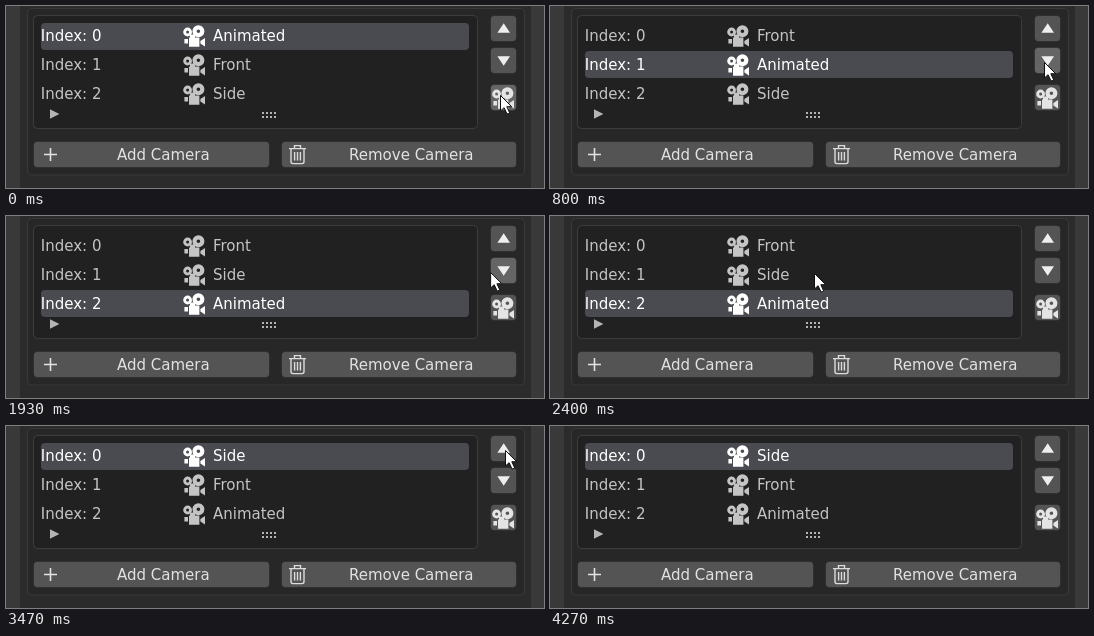
An HTML page for the animation above (4.94 s loop, 538 by 182 pixels).

```html
<!DOCTYPE html>
<html lang="en">
<head>
<meta charset="utf-8">
<title>Camera list</title>
<style>
  html, body { margin: 0; width: 100%; height: 100%; overflow: hidden; background: #393939; }
  svg { display: block; width: 538px; height: 182px; }
  text { font: 15px "DejaVu Sans", sans-serif; fill: #e2e2e2; }
  #rows text { fill: #c4c4c4; }
  #rows .on text { fill: #fff; }
  .icon { color: #c4c4c4; }
  .on .icon { color: #fff; }
</style>
</head>
<body>
<svg viewBox="0 0 538 182" xmlns="http://www.w3.org/2000/svg">
  <defs>
    <!-- Film camera, 22 x 22 -->
    <g id="cam">
      <path fill="currentColor" fill-rule="evenodd" d="
        M0.2 7a4.4 4.4 0 1 0 8.8 0a4.4 4.4 0 1 0 -8.8 0z
        M3.1 7a1.5 1.5 0 1 0 3 0a1.5 1.5 0 1 0 -3 0z
        M9.4 6.2a6 6 0 1 0 12 0a6 6 0 1 0 -12 0z
        M13.6 6.2a1.8 1.8 0 1 0 3.6 0a1.8 1.8 0 1 0 -3.6 0z"/>
      <path fill="currentColor" d="M6 12.6h10.4v9.2H6z M17.4 16l4.6-3v8.6l-4.6-3z M1.4 14h3.6v4.6h-3.6z M7 9.5h5v4h-5z"/>
    </g>
  </defs>
  <rect width="538" height="182" fill="#393939"/>
  <rect x="14" width="511" height="182" fill="#2b2b2b"/>
  <rect x="21.5" y="2.5" width="497" height="166.5" rx="4" fill="#272727" stroke="#393939"/>
  <rect x="27.5" y="9.5" width="444" height="113" rx="4" fill="#212121" stroke="#3d3d3d"/>
  <rect id="bar" x="35" width="428" height="27" rx="4" fill="#4a4b50"/>
  <g id="rows"></g>
  <path d="M44 103.2l9.4 4.8l-9.4 4.8z" fill="#b4b4b4"/>
  <g id="grip" fill="#b4b4b4"></g>
  <g id="buttons" stroke="#000" stroke-opacity=".22"></g>
  <path d="M497.7 17.3l6.3 9.4h-12.6z M497.7 59.7l6.3-9.4h-12.6z" fill="#eee"/>
  <use href="#cam" x="486" y="81" color="#e4e4e4"/>
  <path d="M38 148.5h13M44.5 142v13" stroke="#e2e2e2" stroke-width="1.6"/>
  <text x="111" y="154">Add Camera</text>
  <g fill="none" stroke="#dcdcdc" stroke-width="1.4">
    <path d="M283 142.6h17M288.5 142v-2.4h6v2.4M285 143v12.6q0 2 2 2h9q2 0 2-2V143"/>
    <path d="M288.6 146v8.6M291.5 146v8.6M294.4 146v8.6"/>
  </g>
  <text x="343" y="154">Remove Camera</text>
  <path id="cursor" d="M0 0V15.4L3.6 12.2L6.6 18.6L9.2 17.4L6.3 11.2H11.2Z"
        fill="#fff" stroke="#111" stroke-width="1" stroke-linejoin="round"/>
</svg>
<script>
const NS = "http://www.w3.org/2000/svg";
const LOOP = 4940;
const $ = id => document.getElementById(id);

function add(parent, tag, attrs, text) {
  const el = document.createElementNS(NS, tag);
  for (const k in attrs) el.setAttribute(k, attrs[k]);
  if (text) el.textContent = text;
  parent.appendChild(el);
  return el;
}

const rows = [0, 1, 2].map(i => {
  const g = add($("rows"), "g", {});
  const y = 35 + 29 * i;
  add(g, "text", { x: 34.8, y }, "Index: " + i);
  add(g, "use", { href: "#cam", x: 177, y: y - 16, class: "icon" });
  return { g, name: add(g, "text", { x: 207, y }) };
});

for (let i = 0; i < 8; i++)
  add($("grip"), "rect", { x: 256 + 4 * (i % 4), y: i < 4 ? 106 : 110, width: 2, height: 2 });

// up, down, camera, add, remove
const buttons = [[484, 9, 27], [484, 41, 27], [484, 78, 27], [27, 135, 237], [275, 135, 236]]
  .map(([x, y, w]) => ({
    x, y, w,
    el: add($("buttons"), "rect", { x: x + 0.5, y: y + 0.5, width: w - 1, height: 26, rx: 4 })
  }));

// [start time, order, selected row]
const lists = [
  [0, "Animated Front Side", 0],
  [800, "Front Animated Side", 1],
  [1470, "Front Side Animated", 2],
  [2470, "Front Side Animated", 1],
  [3470, "Side Front Animated", 0]
];

// [press, release, button]
const presses = [[670, 800, 1], [1330, 1470, 1], [3330, 3470, 0]];

const smooth = p => p * p * (3 - 2 * p);
const linear = p => p;

// [first tick, ticks, x, y, easing]
const moves = [
  [1, 6, 494, 56, smooth],
  [29, 8, 264, 57, smooth],
  [40, 8, 494, 26, smooth],
  [48, 1, 499, 24, linear],
  [61, 4, 195, 201, linear]
];

const tickTime = k => Math.round(k * 100 / 15) * 10;
function tickAt(t) {
  const k = Math.floor((t + 4) * 0.015);
  return tickTime(k) > t ? k - 1 : k;
}

function cursorAt(k) {
  let x = 494, y = 89;
  for (const [start, n, tx, ty, ease] of moves) {
    if (k < start) break;
    const p = ease(Math.min(1, (k - start + 1) / n));
    x += (tx - x) * p;
    y += (ty - y) * p;
  }
  return [x, y];
}

function draw(t) {
  const [, order, selected] = lists.filter(l => l[0] <= t).pop();
  order.split(" ").forEach((name, i) => {
    rows[i].name.textContent = name;
    rows[i].g.setAttribute("class", i === selected ? "on" : "");
  });
  $("bar").setAttribute("y", 17 + Math.floor(28.5 * selected));

  const [x, y] = cursorAt(tickAt(t));
  $("cursor").setAttribute("transform", `translate(${x + 0.5} ${y + 0.5})`);
  $("cursor").setAttribute("visibility", y > 182 ? "hidden" : "visible");

  const press = presses.find(p => t >= p[0] && t < p[1]);
  const refresh = t >= 3470 && t < 3530;
  buttons.forEach((b, i) => {
    const over = !refresh && x >= b.x && x < b.x + b.w && y >= b.y && y < b.y + 27;
    const down = press && press[2] === i;
    b.el.setAttribute("fill", down ? "#4772b3" : over ? "#656565" : "#545454");
  });
}

const begin = performance.now();
function loop() {
  draw((performance.now() - begin) % LOOP);
  requestAnimationFrame(loop);
}
loop();
</script>
</body>
</html>
```
